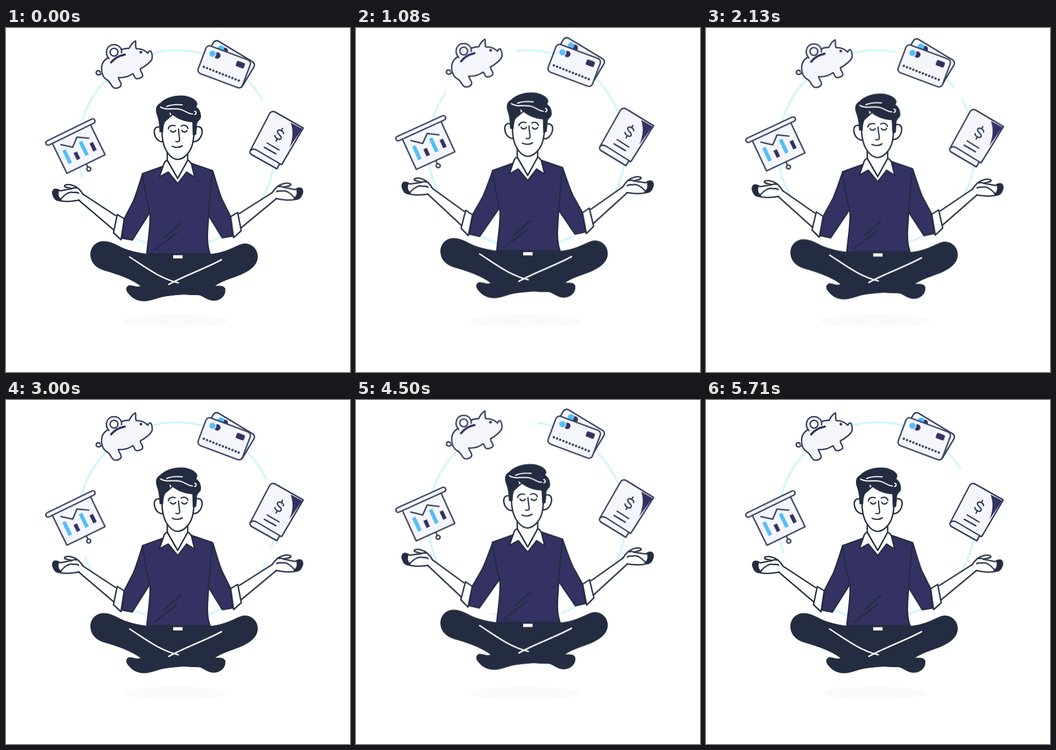
Animation, 640 px wide and 640 px high, one loop 5750 ms. Source, as an HTML page without scripts:

```html
<!DOCTYPE html>
<html lang="en">
<head>
<meta charset="utf-8">
<title>Balance</title>
<style>
html, body { margin: 0; width: 100%; height: 100%; overflow: hidden; background: #fff; }
svg { display: block; width: 100%; height: 100%; }
path, line, rect, circle { stroke-linecap: round; stroke-linejoin: round; }

.man { stroke: #232c41; stroke-width: 2.6; fill: #fff; }
.item { stroke: #343c5c; stroke-width: 2.6; fill: #f4f6fb; }
.line { fill: none; }
.knit { fill: #343262; }
.dark { fill: #232c41; }
.shine { fill: none; stroke: #fff; }
.blue { fill: #56bdf8; stroke: none; }
.navy { fill: #343262; stroke: none; }

.ring {
  fill: none; stroke: #d2f6fc; stroke-width: 4;
  stroke-dasharray: 152 16.2 24.7 9 133.2 24.9;
  transform-origin: 317.5px 225px;
  animation: spin 5.75s linear infinite;
}
.bob { animation: bob 1.4375s cubic-bezier(.37, 0, .63, 1) infinite alternate; }
.tilt { transform-origin: 319px 250px; animation: tilt 2.875s ease-in-out infinite; }

.body { --to: translateY(-6.7px); }
.arm { --to: rotate(3deg); transform-origin: 255px 280px; }
.shadow { --to: scaleX(1.083); transform-origin: 314.5px 545px; fill: #fafafa; }
.board { --to: translateY(-8px) rotate(1.7deg); transform-origin: 130px 220px; }
.pig { --to: translateY(-3.1px) rotate(-1.7deg); transform-origin: 220px 67px; }
.front { --to: translateY(-3.1px); }
.back { --to: translateY(-6.6px); }
.book { --to: translateY(-6.8px) rotate(2.2deg); transform-origin: 503px 208px; }

@keyframes spin { from { transform: rotate(-5deg); } to { transform: rotate(355deg); } }
@keyframes bob { from { transform: none; } to { transform: var(--to); } }
@keyframes tilt {
  0%, 100% { transform: rotate(0); }
  34% { transform: rotate(1deg); }
  60% { transform: rotate(-1.1deg); }
}
</style>
</head>
<body>
<svg viewBox="0 0 640 640">
  <defs>
    <g id="arm">
      <path d="M143 308 L206 350 L203 377 L135 320 Z" stroke="none"/>
      <path class="line" d="M143 309 L204 349 M135 320 L202 377"/>
      <path d="M144 310 C137 299 131 294 123 292.500 C117 290.500 108 291 109 294.500 C111 298 119 296 122 299 L101 303 C93 298 86 302 87 308 C89 316 93 321 99 321 C110 324 122 323 136 320"/>
      <path class="line" d="M102 318 C110 309 118 304 125 306 C130 306 133 305 135 307.500 M122 299 C126 297 129 297 131 298"/>
      <path class="dark" stroke-width="1.500" d="M98 301.500 C93 298 87 299 87 305 C88 314 93 321.500 101 321.500 L103 319 C97 316 96 309 98 301.500 Z"/>
      <path class="knit" d="M254 272 C248 290 243 308 237 322 L220 355 L216 391 L235 394.500 L272 336 L264 290 Z"/>
      <path d="M207 347 L220 355 L214 394 L200 381 Z"/>
    </g>
  </defs>

  <ellipse class="shadow bob" cx="314.500" cy="545" rx="97" ry="11.500"/>
  <circle class="ring" cx="317.500" cy="225" r="183.500" pathLength="360"/>

  <g class="item">
    <g class="board bob">
      <g transform="translate(119.500 194) rotate(-26)">
        <rect x="-39" y="3" width="79" height="63"/>
        <rect x="-50" y="-4.500" width="101" height="8.500" rx="4.200"/>
        <path class="line" d="M-25.800 13 L-8 27 L7.300 13.600 L26.200 25"/>
        <path class="blue" d="M-28.500 24.500 h7 V52 h-7 Z M6 24 h7 V52 h-7 Z"/>
        <path class="navy" d="M-11.500 37.500 h7 V52 h-7 Z M23 34.500 h7 V51 h-7 Z"/>
        <line x1="1" y1="66" x2="1" y2="73"/>
        <circle cx="1" cy="76.700" r="3.700"/>
      </g>
    </g>

    <g class="pig bob">
      <path d="M229 38 C232 32 236 26 241 24 C242 30 240 35 242.500 38.500 C251 38 258 41 264 47 C265 44 267 42 269.500 43 C272 48 273 54 271 59 C268 64 261 70 250 76 C249 80 256 86 254 90 C252 93 245 95 242 94 C239 93 239 88 236 85 C229 90 219 93 209 92 C210 98 216 103 214 107 C211 112 204 113 200 111 C195 107 194 99 187 96 C179 91 177 80 178 72 C179 61 188 55 198 51 C207 44 217 37 229 38 Z"/>
      <path d="M191.500 57 C182 46 188 31 201 31 C210 31 216 38 215 46"/>
      <circle cx="201" cy="45" r="7.300" fill="#fff"/>
      <path class="line" d="M177 85 C172 90 167 86 168 82 C170 78 175 79 175 82.500"/>
      <path class="line" stroke="#343262" stroke-width="4" d="M195.500 64 C202 56 211 51.500 221 49.500"/>
      <circle class="navy" cx="251" cy="45" r="2.500"/>
    </g>

    <g class="back bob">
      <rect x="-44" y="-27.500" width="88" height="55" rx="7" transform="translate(413 67.300) rotate(31)"/>
      <circle class="navy" cx="407" cy="42.500" r="6"/>
      <circle class="blue" cx="400" cy="38.500" r="6"/>
    </g>
    <g class="front bob">
      <g transform="translate(406 72.200) rotate(20.500)">
        <rect x="-44" y="-27.500" width="88" height="55" rx="7"/>
        <circle class="navy" cx="-19.500" cy="-15.300" r="6"/>
        <circle cx="-29" cy="-15" r="6.600" fill="#56bdf8" stroke="#f4f6fb" stroke-width="1.600"/>
        <rect class="navy" x="18.700" y="-19.600" width="16" height="10.500" rx="2.500"/>
        <path class="line" stroke-width="4.400" stroke-dasharray="0 6.340" d="M-35.500 13.300 L34.500 14.500"/>
      </g>
    </g>

    <g class="book bob">
      <path d="M501 156.500 L553 186 L513 254 L509 253 L504 262 L456 235 C453 232 453 230 455 227 L490 160 C492 156 496 154 501 156.500 Z"/>
      <path class="line" d="M455 228 C458 224 462 225 466 227 L512 254 M486 214 L508 227 M480.500 222 L502 234"/>
      <path class="navy" d="M529.500 176 L551 187.500 L527.500 222 C534 206 535 191 529.500 176 Z"/>
      <path class="line" transform="translate(508.500 198.500) rotate(27)" d="M6 -5 C5 -9.500 -6 -9.500 -6 -4.300 C-6 1 6 -1 6 4.500 C6 9.500 -5 9.500 -6.500 5 M0 -13 V-8.500 M0 8.500 V13"/>
    </g>
  </g>

  <g class="man body bob">
    <g class="arm bob"><use href="#arm"/></g>
    <g transform="translate(639 -4.500) scale(-1 1) rotate(-.8 255 280)">
      <g class="arm bob"><use href="#arm"/></g>
    </g>

    <path class="dark" stroke-width="1" d="M262 420.500 C245 418.500 231 415 217 409.500 C204 403 193 396.500 180 397 C166 398 157 409 157.500 422 C158 437 168 446 182 450.500 C208 458 232 466 251 480 C244 484 238 479 229 479 C222 482 223 489 229 495 C236 504 247 508 258 508 C272 507 283 501 296 499 C310 497 322 496 332 495.500 C344 497 352 496 361 497 C370 501 377 507 387 507 C401 506 409 497 407.500 485 C405 479 397 480 388 480 C400 471 418 466 436 459 C454 451 467 442 468 426 C468 411 457 401 443 401.500 C430 402.500 414 418 379 421 Z"/>
    <path class="shine" d="M230 426 C258 444 286 466 320.500 474 M401 431 C370 448 331 461 303 477"/>

    <path class="knit" d="M293 257 L254 271 C257 296 262 322 268 346 C269 372 264 396 262 420 L379.500 420 C375 408 374 392 375 377 L377 346 C379 318 381 290 384.500 265.500 L345 252 Z"/>
    <path class="line" d="M275 414 L318 381 M295.500 389.500 L326 362.500"/>
    <rect x="311" y="422.700" width="17.500" height="6" stroke="none"/>

    <path d="M300 228 V247 L319 281 L338 247 V228 Z"/>
    <path d="M300 246 C296 247 294 251 293 255 L285 277.500 L302 268 L319.500 289.500 L336 268 L351 277.500 L345 253 C343 249 341 247 338 246 L319.500 280 Z"/>

    <g class="tilt">
      <path d="M289 186 C281 181 275 186 276 195 C277 205 284 212 291 211.500 L300 200 Z"/>
      <path d="M351 186 C358 181 365 184 365 193 C364 204 357 211.500 349 211.500 L342 200 Z"/>
      <path d="M290 178 C290 196 290 212 297 226 C303 237 311 244.500 320 244.500 C330 244 340 234 345 222 C350 209 350 192 350 176 L320 152 Z"/>
      <path class="dark" stroke-width="1" d="M286 193 C286 180 284 169 281 161 C278 152 279 144 287 140 C297 129 317 124.500 333 126.500 C346 129 356 135 355.500 142 L353.500 147 C360 150 364 161 361.500 169 C359 172 356 174 355 178 L353.500 198 L348 200 L347 175 C330 174 314 167 303 155 C306 164 304 166 299 169 C294 175 292 183 292 193 Z"/>
      <path class="shine" stroke-width="2.200" d="M287.500 147 C298 154 312 148 325 151.500 C334 154 339 160 347 160 M299 146 C308 142 318 142 328 143 M351 155 C355 155 354 161 351 161"/>
      <path class="line" stroke-width="2.300" d="M302 187.500 C303 182 309 180 315 182 M326 182.500 C331 179.500 337 181 338.500 187 M306 190.500 C308 194.500 314 194.500 316 190.500 M327 190.500 C329 194.500 335 194.500 337 190.500 M321 188 C321 196 323 203 323 208 C323 212 319 212 316 211 M309 220 C315 223 323 223 328 219"/>
    </g>
  </g>
</svg>
</body>
</html>
```
